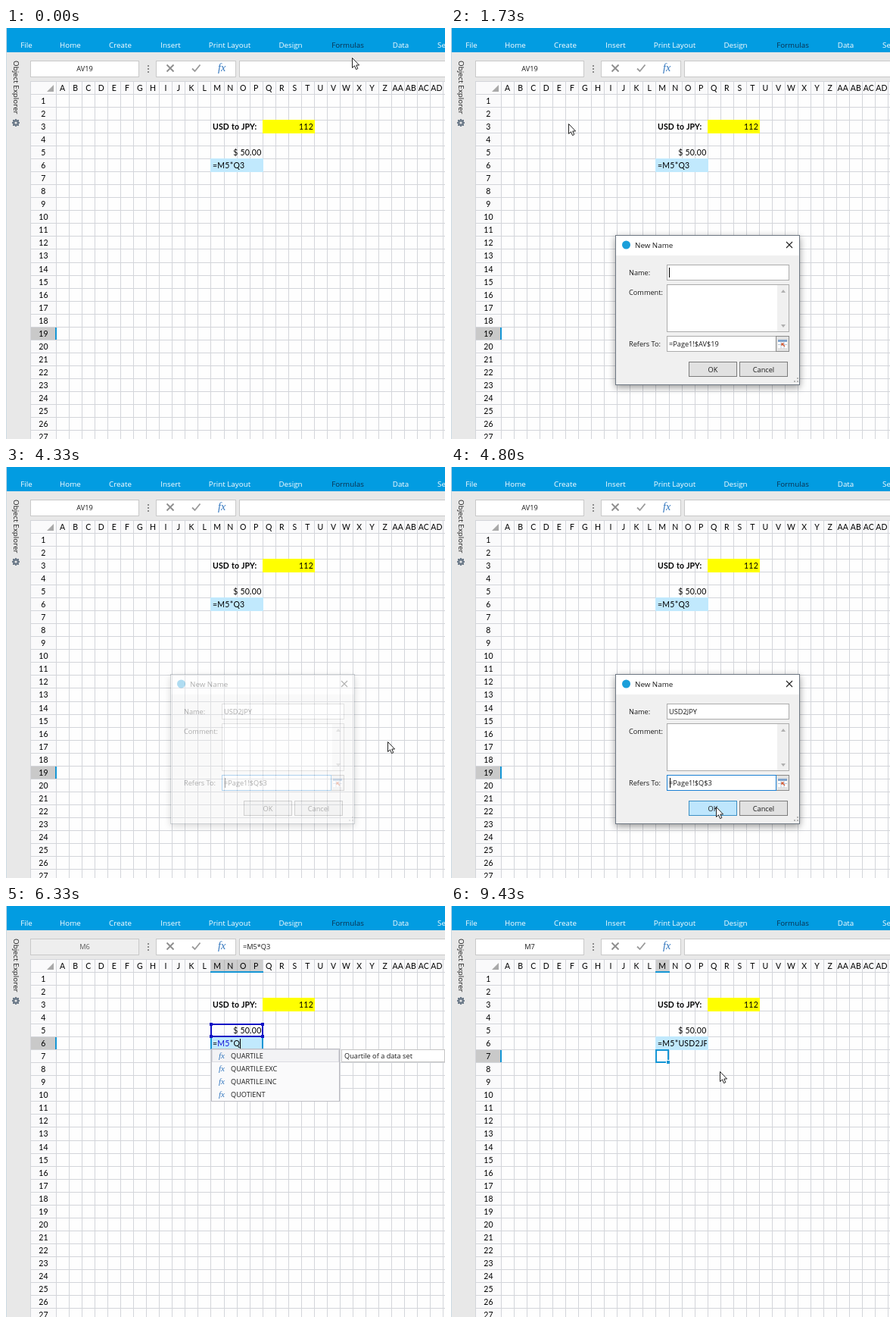
Animation, 580 px wide and 542 px high, one loop 9600 ms. Source, as an HTML page:

```html
<!DOCTYPE html>
<html lang="en">
<head>
<meta charset="utf-8">
<title>Named cell in a spreadsheet</title>
<style>
html, body { margin: 0; height: 100%; overflow: hidden; background: #fefefe; }
svg { display: block; width: 100vw; height: 100vh; }
text { font: 9.8px "Open Sans", "Noto Sans", sans-serif; fill: #1a1a1a; white-space: pre; }
.sheet { font: 10.5px Lato, sans-serif; letter-spacing: .25px; fill: #000; }
.bold { font-weight: 700; letter-spacing: .1px; word-spacing: .5px; }
.small { font-size: 9.2px; }
.mid { text-anchor: middle; }
.end { text-anchor: end; }
.tab { fill: #fff; font-weight: 500; }
.group { fill: #4d566b; }
.fx { font: italic 14px "Liberation Serif", serif; fill: #2f74bd; }
.big { font-size: 27px; }
rect, .crisp { shape-rendering: crispEdges; }
.window { filter: drop-shadow(0 3px 5px #0006); }
</style>
</head>
<body>
<svg id="stage" viewBox="0 0 580 542" preserveAspectRatio="none"></svg>
<script>
const LOOP = 9600, PITCH = 17.04, BLUE = '#1596d5', NS = 'http://www.w3.org/2000/svg';
const stage = document.getElementById('stage');

// ---- drawing helpers ----
const text = (x, y, s, cls = '', attrs = '') => `<text x="${x}" y="${y}" class="${cls}" ${attrs}>${s}</text>`;
const rect = (x, y, w, h, fill) => `<rect x="${x}" y="${y}" width="${w}" height="${h}" fill="${fill}"/>`;
const box = (x, y, w, h, fill, line, lw = 1) =>
  `<rect x="${x + lw / 2}" y="${y + lw / 2}" width="${w - lw}" height="${h - lw}" fill="${fill}" stroke="${line}" stroke-width="${lw}"/>`;
const path = (d, stroke, w = 1, fill = 'none', cls = '') =>
  `<path d="${d}" stroke="${stroke}" stroke-width="${w}" fill="${fill}" class="${cls}"/>`;
const dot = (x, y, r, fill) => `<circle cx="${x}" cy="${y}" r="${r}" fill="${fill}"/>`;
// Content shown from one time to another, with an optional fade at the start.
const during = (from, to, content, fade = 0) => `<g data-on="${from},${to},${fade}">${content}</g>`;
const range = (n, fn) => Array.from({ length: n }, (_, i) => fn(i)).join('');

// Pixel of the grid line before a column (A = 0) or row (first = 1).
const colX = c => Math.round(66 + PITCH * c), rowY = r => Math.round(87 + PITCH * (r - 1));
const colName = c => (c > 25 ? 'A' : '') + String.fromCharCode(65 + c % 26);
const M = 12, Q = 16;

// ---- sheet ----
function grid() {
  const cols = range(31, c => `M${colX(c) + .5} 71V542`), rows = range(27, r => `M32 ${rowY(r + 1) + .5}H580`);
  return rect(32, 70, 548, 17, '#fafafb') + rect(32, 87, 34, 455, '#fafafb') +
    path(cols + rows + 'M32.5 70V542M32 70.5H580', '#d3d5da', 1, 'none', 'crisp');
}

function headers() {
  const mark = (row, cols) => {
    const y = rowY(row) + 1, x = colX(M), w = colX(M + cols) - x;
    return rect(33, y, 33, 16, '#c9c9c9') + rect(65, y, 2, 16, BLUE) +
      (cols ? rect(x + 1, 71, w - 1, 16, '#cdcdcd') + range(cols - 1, i => rect(colX(M + 1 + i), 71, 1, 16, '#b9b9b9')) +
        rect(x, 86, w + 1, 2, BLUE) : '');
  };
  return during(0, 5660, mark(19, 0)) + during(5660, 9060, mark(6, 4)) + during(9060, LOOP, mark(7, 1)) +
    path('M63 75V84H54Z', 'none', 0, '#a9a9a9') +
    range(30, c => text(74.8 + PITCH * c, 83, colName(c), 'sheet mid')) +
    range(27, r => text(49.5, 100 + PITCH * r, r + 1, 'sheet mid'));
}

// Rectangle of four merged cells, including the grid lines around it.
const merged = (c, r) => [colX(c), rowY(r), colX(c + 4) - colX(c) + 1, rowY(r + 1) - rowY(r) + 1];
function marker(c, r, color) {
  const [x, y, w, h] = merged(c, r);
  const corner = (cx, cy) => rect(cx - 2, cy - 2, 4, 4, color);
  return box(x, y, w, h, 'none', color, 2) +
    corner(x + 1, y + 1) + corner(x + w - 1, y + 1) + corner(x + 1, y + h - 1) + corner(x + w - 1, y + h - 1);
}

// [from, to, typed part, caret visible]
const edits = [
  [5760, 5930, 'Q3', 1], [5930, 6130, 'Q3', 0], [6130, 6530, 'Q', 1], [6530, 6660, '', 1], [6660, 6860, 'U', 1],
  [6860, 7030, 'US', 1], [7030, 7300, 'USD', 1], [7300, 7530, 'USD', 0], [7530, 8800, 'USD', 1], [8800, 9060, 'USD2JPY', 1]
];
const names = [
  [1600, 1960, ''], [1960, 2000, 'U'], [2000, 2230, 'US'], [2230, 2400, 'USD'], [2400, 2480, 'USD2'],
  [2480, 2560, 'USD2J'], [2560, 2700, 'USD2JP'], [2700, 3030, 'USD2JPY'], [4330, 4960, 'USD2JPY']
];

function cells() {
  const editing = edits.map(([a, b, s, caret]) => {
    const color = s === 'Q3' ? '#c0392b' : '#000';
    return during(a, b, text(273, 185, `=<tspan fill="#1414d8">M5</tspan>*<tspan fill="${color}">${s}</tspan>`,
      'sheet', caret ? 'data-caret="1"' : ''));
  }).join('');
  const edgeY = rowY(6) + 1;
  return rect(...merged(Q, 3), '#ff0') + rect(...merged(M, 6), '#c1e9fd') +
    text(273, 134, 'USD to JPY:', 'sheet bold') + text(406, 134, '112', 'sheet end') +
    text(337.5, 168, '$ 50.00', 'sheet end') +
    during(0, 5760, text(273, 185, '=M5*Q3', 'sheet')) +
    during(3700, 4330, `<rect x="340" y="122" width="67" height="16" fill="none" stroke="#217346" stroke-width="2" stroke-dasharray="4 2"/>`) +
    during(5660, 5760, box(...merged(M, 6), 'none', BLUE, 2)) +
    during(5760, 9060, rect(colX(M), edgeY, 2, 16, BLUE) + rect(colX(Q) - 1, edgeY, 2, 16, BLUE) + marker(M, 5, '#1212c4')) +
    during(5760, 6130, marker(Q, 3, '#c0392b')) + editing +
    during(9060, LOOP, `<svg x="271" y="173" width="67" height="16">${text(2, 12, '=M5*USD2JPY', 'sheet')}</svg>` +
      box(270, 189, 18, 18, '#fefefe', BLUE, 2) + rect(284, 203, 5, 5, '#fff') + rect(285, 204, 4, 4, BLUE));
}

// ---- window frame ----
const tabs = [[27, 'File'], [85, 'Home'], [151, 'Create'], [217.5, 'Insert'], [295.5, 'Print Layout'], [376, 'Design'],
  [451.5, 'Formulas'], [521.5, 'Data']];

function frame() {
  const bar = (a, b, name) => during(a, b, text(104, 57, name, 'mid small'));
  const muted = (a, b, name) => during(a, b, box(32, 43, 144, 22, '#eee', '#c9c9c9') + text(104, 57, name, 'mid small', 'fill-opacity=".7"'));
  const gear = dot(13, 125, 4, '#6c7a89') + range(8, i => `<rect x="12" y="119.8" width="2" height="3" fill="#6c7a89" transform="rotate(${45 * i} 13 125)"/>`) + dot(13, 125, 1.6, '#e8e8e8');
  return rect(0, 32, 580, 38, '#e8e8e8') + rect(0, 32, 32, 510, '#e8e8e8') +
    rect(0, 0, 580, 32, '#029ce1') + rect(0, 0, 1, 542, '#ccdbe4') +
    tabs.map(([x, s]) => text(x, 25.5, s, 'mid tab', s === 'Formulas' ? 'style="fill:#0b2f4d"' : '')).join('') +
    text(570, 25.5, 'Settings', 'tab') +
    text(0, 0, 'Object Explorer', '', 'transform="translate(10 43) rotate(90)"') + gear +
    box(32, 43, 144, 22, '#fff', '#c9c9c9') + box(198, 43, 106, 22, '#fff', '#c9c9c9') + box(308, 43, 274, 22, '#fff', '#c9c9c9') +
    [49, 53, 57].map(y => rect(187, y, 2, 2, '#8b8b8b')).join('') +
    path('M212.5 48.5L221.5 57.5M221.5 48.5L212.5 57.5', '#8d8d8d', 1.8) + path('M246 53.5L249.5 57L256.5 48.5', '#9a9a9a', 1.8) +
    text(280, 57, 'fx', 'fx') +
    bar(0, 5660, 'AV19') + bar(5660, 5760, 'M6') + bar(9060, LOOP, 'M7') +
    muted(3060, 4330, 'AV19') + muted(5760, 9060, 'M6') +
    during(3060, 4330, box(308, 43, 274, 22, '#eee', '#c9c9c9')) +
    during(5660, 9060, text(313, 57, '=M5*Q3', 'small'));
}

function ribbon() {
  const nameIcon = box(82, 54, 25, 11, '#eaf5fc', '#2487c4', 1.6) +
    path('M86 54V46L90 42H102V54Z', '#2487c4', 1.5, '#fff') + path('M90 47H98M90 50H99M86 60H103', '#2487c4', 1.4) +
    path('M82 54L86 50M107 54L102 50', '#2487c4', 1.5);
  const dataIcon = `<rect x="160" y="41" width="26" height="25" rx="3" fill="#d9603b"/>` + rect(163, 45, 20, 3, '#fff') +
    [51, 56, 61].map(y => rect(163, y, 8, 2.5, '#fff')).join('') + rect(174, 51, 9, 5, '#fff') + rect(174, 58, 9, 5, '#fff');
  return rect(1, 33, 579, 80, '#fefefe') + rect(0, 113, 580, 1, '#c8c8c8') + rect(411, 12, 79, 21, '#fefefe') +
    text(451.5, 25.5, 'Formulas', 'mid') +
    [55, 130, 214].map(x => rect(x, 39, 1, 68, '#d9d9d9')).join('') +
    text(17, 62, 'fx', 'fx big') + nameIcon + dataIcon +
    text(28, 77, 'Functions', 'mid') + text(94, 77, 'Name', 'mid') + text(94, 89, 'Manager', 'mid') +
    text(173, 77, 'OData', 'mid') + text(173, 89, 'Generator', 'mid') +
    text(27.5, 105, 'Functions', 'mid group') + text(92.5, 105, 'Defined Names', 'mid group') + text(172.5, 105, 'OData Generator', 'mid group') +
    during(1070, 1150, rect(249, 12, 91, 21, '#22b8fc') + text(295.5, 25.5, 'Print Layout', 'mid', 'style="fill:#175a9c"'));
}

// ---- dialogs ----
const dialog = (x, y, w, h, content) => `<g class="window">${box(x, y, w, h, '#f0f0f0', '#6d7782')}</g>` +
  rect(x + 1, y + 1, w - 2, 26, '#fff') + dot(x + 14.5, y + 13, 5.5, '#1b9fda') + text(x + 26, y + 17, 'New Name') +
  path(`M${x + w - 18} ${y + 9}l8 8m0 -8l-8 8`, '#222', 1.1) + content;
const picker = (x, y) => box(x, y, 18, 21, '#e3e3e3', '#8a8a8a') + rect(x + 3, y + 5, 12, 11, '#fff') +
  rect(x + 3, y + 5, 12, 3, '#7fa3cc') + path(`M${x + 3} ${y + 11.5}h12m-8 -4v9m4 -9v9`, '#b9c7da') +
  path(`M${x + 12} ${y + 14}l-4 -4m0 3v-3h3`, '#d2562e', 1.2);

function nameDialog() {
  const typed = names.map(([a, b, s]) => during(a, b, text(288, 326, s, 'small', a < 2700 ? 'data-caret="1"' : ''))).join('');
  return dialog(217, 273, 244, 198,
    text(235, 326, 'Name:', 'small') + text(235, 352, 'Comment:', 'small') + text(235, 419.5, 'Refers To:', 'small') +
    box(285, 312, 162, 21, '#fff', '#acacac') + box(285, 338, 162, 63, '#fff', '#acacac') + rect(431, 339, 15, 61, '#f0f0f0') +
    path('M436 349l3 -4l3 4zM436 391l3 4l3 -4z', 'none', 0, '#b0b0b0') +
    box(285, 406, 145, 21, '#fff', '#acacac') + picker(429, 406) + typed +
    during(1600, 3030, text(288, 420, '=Page1!$AV$19', 'small')) +
    during(4330, 4960, box(285, 406, 145, 21, '#fff', '#1c80d4') + text(288, 420, '=Page1!$Q$3', 'small') + rect(289, 410, 1, 13, '#000')) +
    box(314, 440, 64, 20, '#e1e1e1', '#7c7c7c') + during(4600, 4960, box(314, 440, 64, 20, '#bee6fd', '#3c8fc4')) +
    box(381, 440, 64, 20, '#e1e1e1', '#7c7c7c') + text(346, 453.5, 'OK', 'mid small') + text(413, 453.5, 'Cancel', 'mid small') +
    [[457, 461], [457, 465], [453, 465]].map(([x, y]) => rect(x, y, 2, 2, '#b5b5b5')).join(''));
}

const pickDialog = () => dialog(98, 320, 425, 64,
  box(107, 354, 389, 21, '#fff', '#4a92d0') + picker(495, 354) +
  during(3060, 3700, rect(112, 359, 69, 13, '#7fb9ee') + text(113, 368.5, '=Page1!$AV$19', 'small', 'style="fill:#0a3fb0"')) +
  during(3700, 4330, text(113, 368.5, '=Page1!$Q$3', 'small', 'data-caret="1"')));

// ---- suggestions while typing ----
const tag = y => path(`M281 ${y}l4 -4h8v8h-8z`, '#6d9fd0', 1, '#d7e9f8') + path(`M286 ${y - 1.5}h5m-5 3h5`, '#6d9fd0');
const suggest = items => box(271, 188, 170, 17 * items.length + 2, '#fafafb', '#bdbdc3') +
  box(272, 189, 168, 17, '#f3f3f5', '#dcdce2') +
  items.map((s, i) => (s === 'USD2JPY' ? tag(198 + 17 * i) : text(281, 201 + 17 * i, 'fx', 'fx', 'style="font-size:11px"')) +
    text(297, 201 + 17 * i, s, 'small')).join('');
const tip = s => box(443, 189, 137, 17, '#fff', '#c4c4c4') + text(447, 201, s, 'small');

stage.innerHTML = rect(0, 0, 580, 542, '#fefefe') + frame() + grid() + headers() + cells() +
  during(360, 630, box(452, 37, 53, 21, '#fff', '#b5b5b5') + text(478.5, 51, 'Formulas', 'mid small'), 70) +
  during(630, 1450, ribbon(), 100) +
  during(1600, 3030, nameDialog(), 90) + during(3060, 4330, pickDialog(), 90) + during(4330, 4960, nameDialog(), 90) +
  during(6200, 6530, suggest(['QUARTILE', 'QUARTILE.EXC', 'QUARTILE.INC', 'QUOTIENT'])) +
  during(6330, 6530, tip('Quartile of a data set')) +
  during(6660, 6860, suggest(['UNICHAR', 'UNICODE', 'UPPER', 'USD2JPY']) + tip('Character by number')) +
  during(6860, 8800, suggest(['USD2JPY'])) +
  `<g id="pointer">${path('M.5 .5V13.5L3.5 10.8L5.5 15.6L7.8 14.6L5.8 10H9.6Z', '#222', 1, '#fff')}</g>` +
  `<g id="beam">${path('M-3 -9.5H-.5M.5 -9.5H3M0 -9V9M-3 9.5H-.5M.5 9.5H3', '#333')}</g>`;

// Carets sit right behind the text they belong to.
stage.querySelectorAll('[data-caret]').forEach(el => {
  const caret = document.createElementNS(NS, 'rect');
  const x = Math.round(+el.getAttribute('x') + el.getComputedTextLength());
  Object.entries({ x, y: el.getAttribute('y') - 10, width: 1, height: 13 }).forEach(([k, v]) => caret.setAttribute(k, v));
  el.after(caret);
});

// ---- motion ----
// [time, x, y] of the pointer
const track = [
  [0, 457, 39], [30, 457, 39], [200, 453, 20], [1030, 453, 20], [1100, 269, 35], [1300, 95, 62], [1650, 95, 62],
  [1900, 340, 322], [2700, 380, 390], [2860, 436, 414], [3000, 436, 414], [3230, 388, 131], [4000, 388, 131],
  [4260, 504, 362], [4400, 504, 362], [4760, 350, 448], [5000, 350, 448], [5130, 534, 440], [5200, 480, 508],
  [5300, 407, 488], [5430, 407, 488], [5500, 321, 178], [7530, 321, 178], [7730, 322, 190], [8030, 324, 194],
  [8400, 324, 194], [8430, 326, 196], [9060, 326, 196], [9430, 355, 218], [LOOP, 355, 218]
];
const hidden = [[1960, 2700], [5760, 7530]];
const timed = [...stage.querySelectorAll('[data-on]')].map(el => [el, ...el.dataset.on.split(',').map(Number)]);
const pointer = document.getElementById('pointer'), beam = document.getElementById('beam');
const show = (el, on) => { el.style.display = on ? '' : 'none'; };

function draw(t) {
  for (const [el, from, to, fade] of timed) {
    show(el, t >= from && t < to);
    if (fade) el.style.opacity = Math.min(1, (t - from + 30) / fade);
  }
  const i = track.findIndex(k => k[0] > t);
  const [t0, x0, y0] = track[i - 1], [t1, x1, y1] = track[i];
  const p = (t - t0) / (t1 - t0), e = p * p * (3 - 2 * p);
  const place = `translate(${Math.round(x0 + (x1 - x0) * e)} ${Math.round(y0 + (y1 - y0) * e)})`;
  pointer.setAttribute('transform', place);
  beam.setAttribute('transform', place);
  const visible = !hidden.some(([a, b]) => t >= a && t < b), typing = t >= 7530 && t < 7830;
  show(pointer, visible && !typing);
  show(beam, visible && typing);
}

const start = performance.now();
(function tick() {
  draw((performance.now() - start) % LOOP);
  requestAnimationFrame(tick);
})();
</script>
</body>
</html>
```
